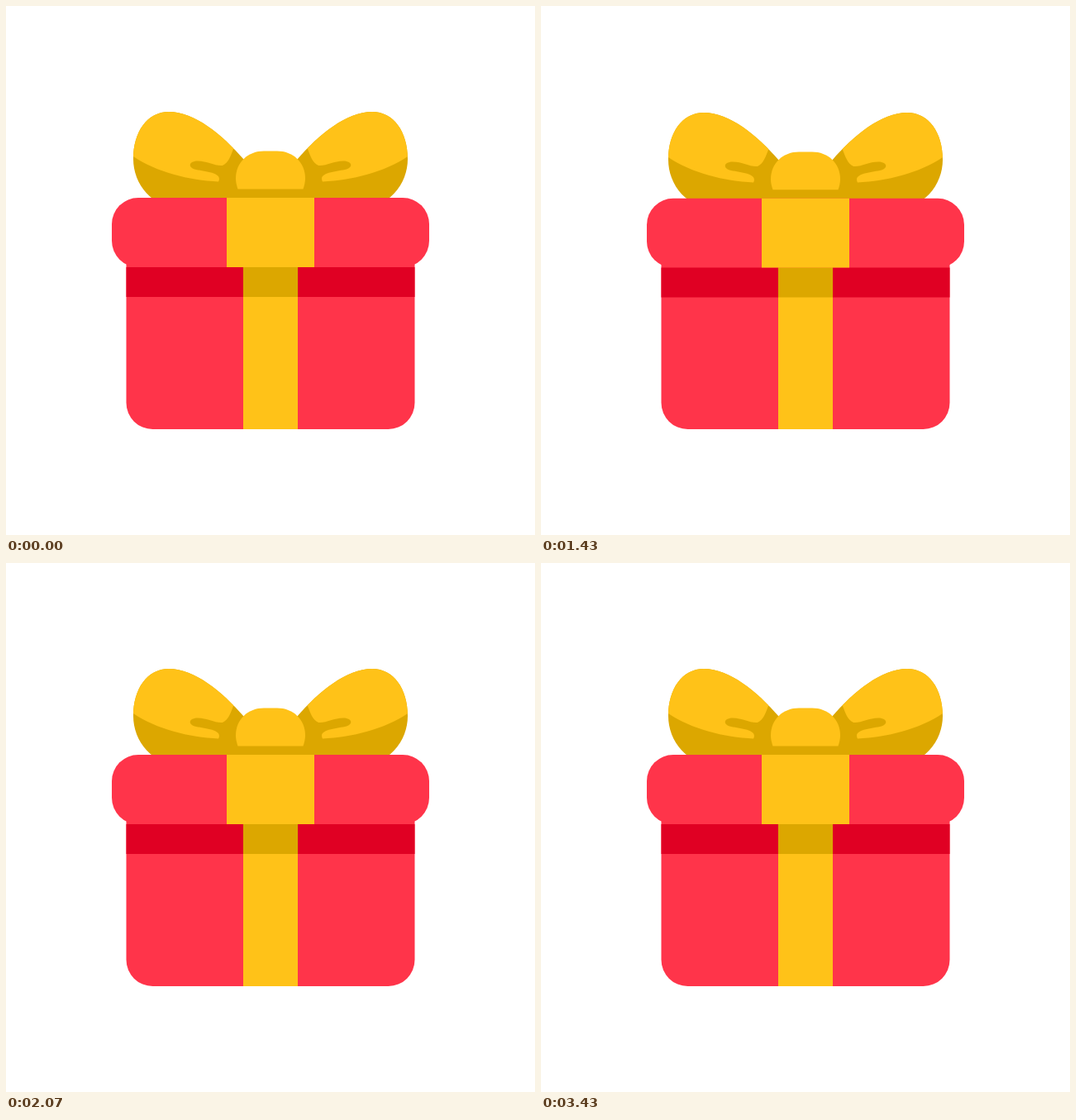
An HTML page with a canvas that plays this animation: 640x640 px, repeating every 4000 ms.

```html
<!DOCTYPE html>
<html lang="en">
<head>
<meta charset="utf-8">
<title>Gift</title>
<style>
  html, body { margin: 0; width: 100%; height: 100%; overflow: hidden; background: #fff; }
  canvas { display: block; width: 640px; height: 640px; }
</style>
</head>
<body>
<canvas id="stage" width="640" height="640"></canvas>
<script>
const ctx = document.getElementById('stage').getContext('2d');

const RED = '#ff344a', DARK_RED = '#e00023', GOLD = '#ffc218', DARK_GOLD = '#dca700';
const LOOP = 4000, STEP = LOOP / 56, PERIOD = 1400;
const FLOOR = 512, CENTER = 320;
const PIVOT = { x: 287, y: 235 };

const SQUASH = 0.916, STRETCH = 1.12, LIFT = 20;
const SQUASHED_AT = 255, PEAK_AT = 380, REST_AT = 605;

const wing = new Path2D(
  'M154 185 C154 152 171 128 197 128 C228 128 261 155 288 186 ' +
  'L304 204 L302 235 L287 235 C262 242 240 246 219 246 C176 246 154 215 154 185 Z');
const wingLight = new Path2D(
  'M154 182 L140 174 V110 H275 V173 C272 181 269 190 262 193 ' +
  'C253 194 244 187.5 232 187.5 C221 187.5 220 195 228 197.5 ' +
  'C240 200.5 263 201 257 212.5 C222 211 182 201 154 182 Z');
const knot = new Path2D(
  'M280.5 221.5 C279 217 278 213 278 208.5 C278 189 293 175.5 312 175.5 H328 ' +
  'C347 175.5 362 189 362 208.5 C362 213 361 217 359.5 221.5 Z');

const smooth = p => p * p * (3 - 2 * p);
const mix = (a, b, k) => a + (b - a) * k;

function pose(t) {
  if (t < SQUASHED_AT) {
    return { scale: mix(1, SQUASH, smooth(t / SQUASHED_AT)), angle: 0 };
  }
  if (t < PEAK_AT) {
    const k = smooth((t - SQUASHED_AT) / (PEAK_AT - SQUASHED_AT));
    return { scale: mix(SQUASH, STRETCH, k), angle: LIFT * k };
  }
  if (t < REST_AT) {
    // The fall sets off a little faster than it settles.
    const k = smooth(((t - PEAK_AT) / (REST_AT - PEAK_AT)) ** 0.85);
    return { scale: mix(STRETCH, 1, k), angle: LIFT * (1 - k) };
  }
  return { scale: 1, angle: 0 };
}

function rect(color, x, y, w, h, radii = 0) {
  ctx.fillStyle = color;
  ctx.beginPath();
  ctx.roundRect(x, y, w, h, radii);
  ctx.fill();
}

function fill(color, path) {
  ctx.fillStyle = color;
  ctx.fill(path);
}

function drawWing(angle, mirrored) {
  ctx.save();
  if (mirrored) {
    ctx.translate(2 * CENTER, 0);
    ctx.scale(-1, 1);
  }
  ctx.translate(PIVOT.x, PIVOT.y);
  ctx.rotate(angle * Math.PI / 180);
  ctx.translate(-PIVOT.x, -PIVOT.y);
  fill(DARK_GOLD, wing);
  ctx.clip(wing);
  fill(GOLD, wingLight);
  ctx.restore();
}

function draw({ scale, angle }) {
  ctx.fillStyle = '#fff';
  ctx.fillRect(0, 0, 640, 640);
  ctx.save();
  ctx.translate(0, FLOOR);
  ctx.scale(1, scale);
  ctx.translate(0, -FLOOR);

  drawWing(angle, false);
  drawWing(angle, true);
  rect(DARK_GOLD, 279, 221, 82, 13);
  fill(GOLD, knot);

  rect(RED, 145.5, 300, 349, 212, [0, 0, 32, 32]);
  rect(RED, 128, 232, 384, 84, 32);
  rect(DARK_RED, 145.5, 316, 349, 36);
  rect(GOLD, 287, 316, 66, 196);
  rect(DARK_GOLD, 287, 316, 66, 36);
  rect(GOLD, 267, 232, 106, 84);
  ctx.restore();
}

// Poses are held at 14 per second, switching on 10 ms ticks.
function heldTime(ms) {
  const tick = Math.floor(ms % LOOP / 10) * 10;
  return Math.floor((tick + 5) / STEP) * STEP % LOOP;
}

const start = performance.now();
function frame() {
  draw(pose(heldTime(performance.now() - start) % PERIOD));
  requestAnimationFrame(frame);
}
frame();
</script>
</body>
</html>
```
